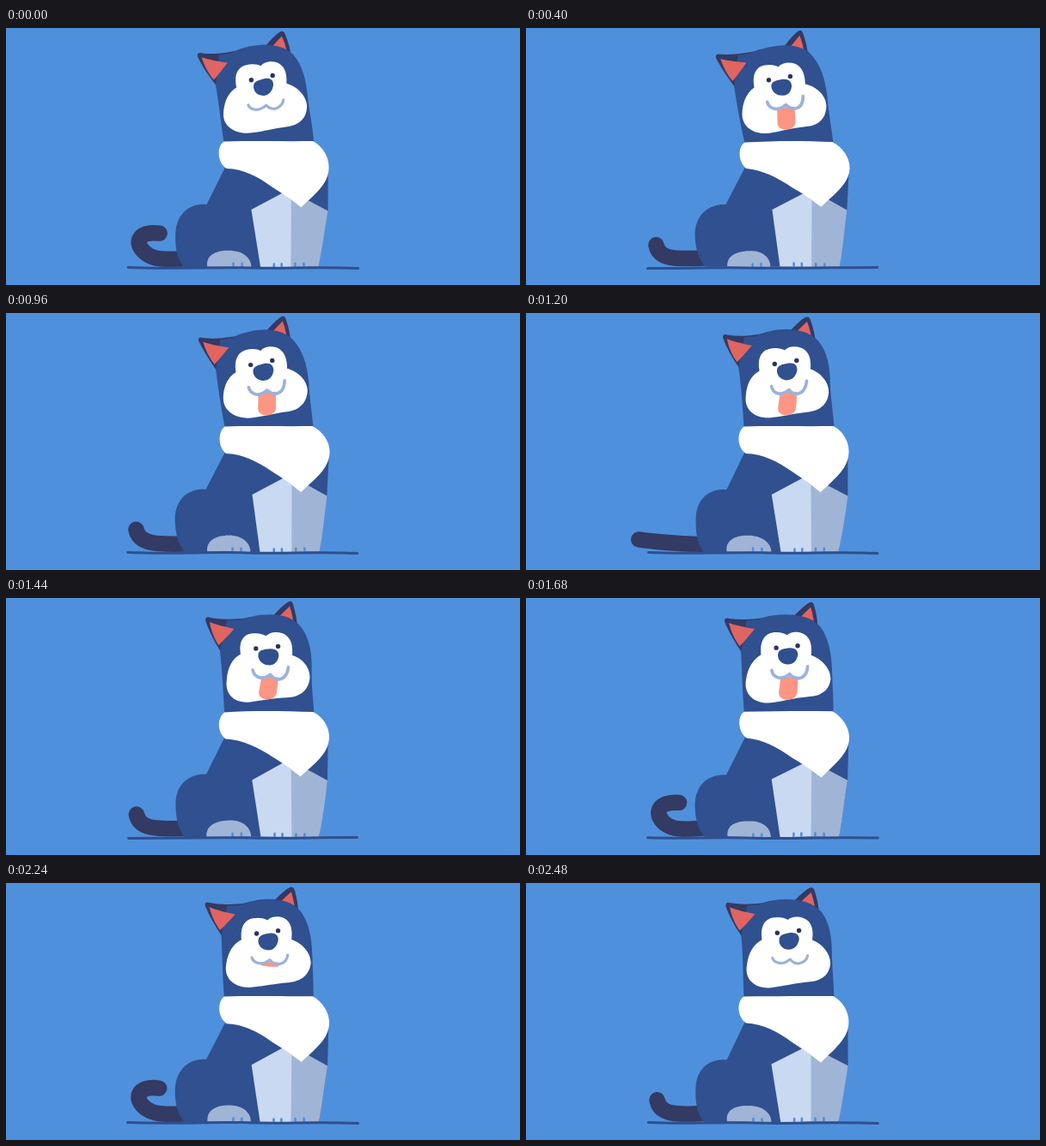
Recreate the animation shown at these times as an HTML page. Size 598 px wide and 300 px high, loop 2.52 s.

```html
<!DOCTYPE html>
<html lang="en">
<head>
<meta charset="utf-8">
<title>Sitting dog</title>
<style>
  html, body { margin: 0; width: 100%; height: 100%; overflow: hidden; background: #4f90dc; }
  svg { display: block; width: 100vw; height: 100vh; }
</style>
</head>
<body>
<svg id="stage" viewBox="0 0 598 300"></svg>
<script>
const LOOP = 2520, STEP = 40;
const SKY = '#4f90dc', NAVY = '#30508f', DARK = '#333a63', RED = '#e06462', GREY = '#a0b4d6', PALE = '#c9d9f1';
const stage = document.getElementById('stage');
const parts = [];

function add(d, look, bends) {
  const el = document.createElementNS('http://www.w3.org/2000/svg', 'path');
  for (const key in look) el.setAttribute(key, look[key]);
  stage.append(el);
  const part = { el, d, bends };
  parts.push(part);
  return part;
}
const fill = (d, color, bends) => add(d, { fill: color }, bends);
const line = (d, color, width, bends) => add(d, {
  fill: 'none', stroke: color, 'stroke-width': width, 'stroke-linecap': 'round', 'stroke-linejoin': 'round'
}, bends);

const CURL = 'M206 269C185 270 173 270 164 264C148 254 151 236 178 239';
const HOOK = 'M206 269C178 270 155 271 152 253';
const FLAT = 'M206 270C180 269 150 268 131 265';
const WAG = [CURL, HOOK, FLAT, HOOK];

// Tail, body and legs
const tail = line(CURL, DARK, 18.5);
fill('M256 160L233 206C215 205 198 215 197 240C197 258 200 270 208 279L300 279L364 279L374 212L375 170Z', NAVY);
fill('M286 212L322 193L334 202L333 279L296 279Z', PALE);
fill('M332 201L350 200L374 213C371 235 368 260 364 279L332 279Z', GREY);
fill('M234 279C232 266 244 260 258 260C275 259 285 268 285 279Z', GREY);
line('M264 275L264 278M274 275L274 278M312 275L312 278M321 275L321 278M337 275L337 278M347 275L347 278', SKY, 2.6);
line('M142 280C190 281 230 279 275 280C320 281 360 279 409 280', '#2f4f8e', 3);

// Head
fill('M221 35C220 31 223 30 226 31C240 32 255 30 272 26L266 50L243 69C235 59 226 46 221 35Z', DARK, true);
fill('M299 22C305 15 310 8 316 4C319 2 321 4 322 7C325 15 328 24 329 34L310 34Z', DARK, true);
fill('M306 23L318 9C321 16 324 25 324.5 34Z', RED, true);
fill('M254 134C249 108 246 90 242 68L246 32L260 30C265 27 270 25 275 24C295 18 318 18 331 30C343 42 348 60 350 80C352 100 356 115 358 134Z', NAVY, true);
fill('M226 36C236 39 247 40 256 41C251 48 245 56 240 62C234 55 229 46 226 36Z', RED, true);
fill('M294 45C298 39 312 38 318 44C324 49 325 58 325 65C338 68 349 79 349 91C349 107 338 114 326 115C310 117 300 120 288 122C270 126 252 118 252 101C252 87 257 76 266 70C263 57 266 47 276 44C284 42 290 43 294 45Z', '#fff', true);
line('M283 61L283 61M308 56L308 56', '#2b3263', 5.4, true);
fill('M286 68C286 62 293 61 299 59.5C306 58.5 309.5 62 309.5 67C309 74 305 79 298 79C291 79 286 74 286 68Z', NAVY, true);
const tongue = fill('', '#fc9583', true);
const mouth = line('', '#9bb2db', 3, true);

// Bandana
fill('M254 133C290 131.5 325 132 357 132.5C369 139 376 151 376 162C376 179 365 189 343 209C335 203 325 195 310 186C293 174 275 165 256 164C251 160 248 154 248 147C248 141 250 136 254 133Z', '#fff');

const clamp = u => Math.min(1, Math.max(0, u));
const ease = (t, a, b) => { const u = clamp((t - a) / (b - a)); return u * u * (3 - 2 * u); };
const rand = n => { const v = Math.sin(n * 91.7 + 4.3) * 43758.5453; return v - Math.floor(v); };

// Rotates about the neck, fading out towards the collar
function bend(x, y, angle) {
  const w = clamp((133 - y) / 32), dx = x - 312, dy = y - 145;
  const c = Math.cos(angle) - 1, s = Math.sin(angle);
  return [x + w * (c * dx - s * dy), y + w * (s * dx + c * dy)];
}

function draw(time) {
  const i = Math.floor((time % LOOP) / STEP), t = i * STEP;
  const tilt = 0.3 * (1 - ease(t, -200, 400)) + ease(t, 700, 1440) + 0.1 * ease(t, 1960, 2480);
  const out = ease(t, 100, 320) - ease(t, 2080, 2300);
  const p = rand(i) * 6.28, q = rand(i + 100) * 6.28;

  tail.d = WAG[Math.floor((i / 3.5 + 0.1) % 1 * 4)];
  const low = 93 + 18 * out, tip = 93 + 29 * out;
  tongue.d = out > 0.02 ? `M292 93L292 ${low}C292 ${tip} 313 ${tip} 313 ${low - out}L312 92Z` : '';
  mouth.d = `M281 ${90 - 3 * out}C283 95 292 97 298 93C300 91.5 301 91 302 90` +
    `C304 92 307 95 313 94C319 92.5 322 88 322 ${84 - 5 * out}`;
  mouth.el.setAttribute('stroke-width', 3.2 + 0.5 * out);

  for (const { el, d, bends } of parts) {
    el.setAttribute('d', d.replace(/([\d.]+) ([\d.]+)/g, (_, a, b) => {
      let x = +a, y = +b;
      if (bends) [x, y] = bend(x, y, 0.093 * tilt);
      x += 0.6 * Math.sin(a * 0.04 + b * 0.06 + p);
      y += 0.6 * Math.sin(a * 0.06 - b * 0.04 + q);
      return x.toFixed(2) + ' ' + y.toFixed(2);
    }));
  }
}

const start = performance.now();
function tick() {
  draw(performance.now() - start);
  requestAnimationFrame(tick);
}
tick();
</script>
</body>
</html>
```
